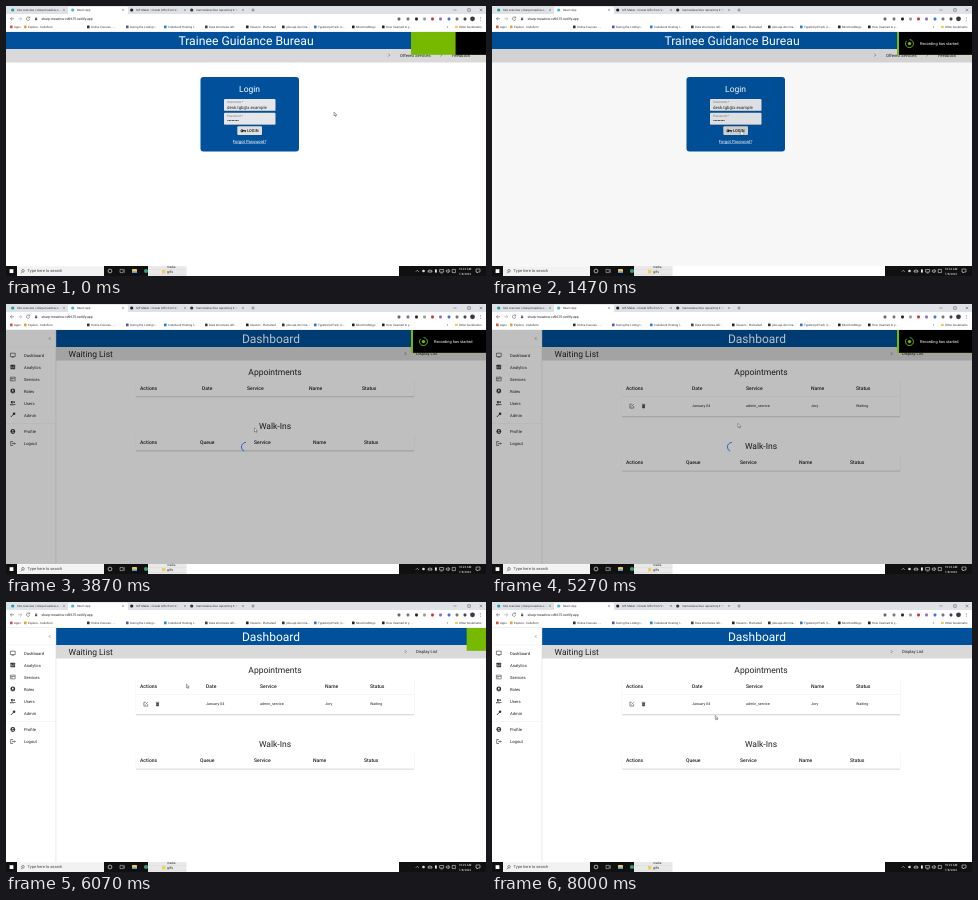
These frames come from a looping animation (480x270 px, 8740 ms). An HTML page:

```html
<!DOCTYPE html>
<html lang="en">
<head>
<meta charset="utf-8">
<title>Dashboard login</title>
<style>
html, body { margin: 0; width: 100%; height: 100%; overflow: hidden; background: #fff; }
svg { display: block; width: 480px; height: 270px; font-family: Roboto, sans-serif; text-rendering: geometricPrecision; }
</style>
</head>
<body>
<svg id="stage" viewBox="0 0 480 270"></svg>
<script>
const LOOP = 8740;
const BLUE = '#00509b', GREEN = '#76b900', INK = '#222';

const text = (x, y, str, size, fill = INK, more = '') =>
  `<text x="${x}" y="${y}" font-size="${size}" fill="${fill}" ${more}>${str}</text>`;
const mid = (x, y, str, size, fill) => text(x, y, str, size, fill, 'text-anchor="middle"');
const bold = (x, y, str, size, fill) => text(x, y, str, size, fill, 'font-weight="500"');
const rect = (x, y, w, h, fill, more = '') =>
  `<rect x="${x}" y="${y}" width="${w}" height="${h}" fill="${fill}" ${more}/>`;
const dot = (x, y, r, fill) => `<circle cx="${x}" cy="${y}" r="${r}" fill="${fill}"/>`;
const line = (d, stroke = '#444', w = 0.6, more = '') =>
  `<path d="${d}" fill="none" stroke="${stroke}" stroke-width="${w}" ${more}/>`;
const group = (id, body, more = '') => `<g id="${id}" ${more}>${body}</g>`;
const chevron = (x, y) => line(`M${x - 0.7} ${y - 1.4}l1.4 1.4l-1.4 1.4`, '#444', 0.5);
const cross = (x, y, s = 0.9, c = '#555') =>
  line(`M${x - s} ${y - s}l${2 * s} ${2 * s}M${x + s} ${y - s}l${-2 * s} ${2 * s}`, c, 0.4);

function browser() {
  const tabs = [
    [11, 'Site overview | sharp-meadow-c...', '#17a2a2', 58],
    [71, 'React App', '#42b8d4', 117],
    [130, 'GIF Maker - Create GIFs from V...', '#222', 179],
    [190, 'marrowlane/dsu: repository 4 —', '#333', 237]
  ];
  const marks = [
    [9, 'Apps', '#d85040'], [23, 'Explore - CodeFern', '#e8a030'],
    [57, 'Online Courses - ...', '#e8a030'], [86, 'Online Courses - ...', '#333'],
    [125, 'During the Listing t...', '#5b50b8'], [163, 'Codebook Hosting I...', '#2b7de0'],
    [204, 'Data structures refr...', '#444'], [245, 'Viewers - Plumeleaf', '#222'],
    [281, 'jobs-api-doc/ma...', '#333'], [313, 'TypeScript Pack | L...', '#3178c6'],
    [351, 'MiscUnixBlogs', '#222'], [381, 'How I learned to y...', '#222']
  ].filter((m, i) => i !== 2);
  const tools = [
    [393, '#666'], [402, '#777'], [410.5, '#222'], [418.5, '#999'], [426.5, '#d03030'],
    [434.5, '#8a6ad0'], [443, '#3d78d8'], [451, '#777'], [459, '#444']
  ];
  return rect(0, 0, 480, 8, '#dee1e6') + rect(62, 0.8, 60, 8, '#fff', 'rx="1.4"') +
    tabs.map(([x, s, c, end]) => dot(x - 4.3, 4, 1.6, c) + text(x, 5.1, s, 2.95, '#333') + cross(end, 4)).join('') +
    line('M245.3 4h3.4M247 2.3v3.4', '#444', 0.5) +
    line('M447.5 4h3M461.7 2.7h2.6v2.6h-2.6z', '#333', 0.4) + cross(475, 4, 1.3, '#333') +
    rect(0, 8, 480, 18, '#fff') +
    line('M8 12.8h-3.6m1.6-1.6l-1.6 1.6l1.6 1.6', '#444', 0.5) +
    line('M12.2 12.8h3.6m-1.6-1.6l1.6 1.6l-1.6 1.6', '#999', 0.5) +
    line('M23.4 11.6a1.7 1.7 0 1 0 .3 1.6M23.7 10.6v1.4h-1.4', '#444', 0.5) +
    rect(29, 12.3, 2.2, 1.9, '#555') + line('M29.5 12.4v-.6a.6 .6 0 0 1 1.2 0v.6', '#555', 0.4) +
    text(35.5, 14, 'sharp-meadow-cd9675.netlify.app', 3.4, '#222') +
    tools.map(([x, c]) => rect(x - 1.4, 11.6, 2.8, 2.8, c, 'rx=".8"')).join('') +
    dot(466.5, 12.8, 2.4, '#3a3a40') +
    [11.3, 12.8, 14.3].map(y => dot(474.5, y, 0.4, '#444')).join('') +
    marks.map(([x, s, c]) => rect(x - 5, 19.6, 2.6, 2.6, c, 'rx=".5"') + text(x - 1, 22, s, 2.95, '#333')).join('') +
    line('M441 20l.9 1l-.9 1', '#555', 0.4) + rect(449, 19.8, 2.8, 2.3, '#f3c95a', 'rx=".4"') +
    text(453, 22, 'Other bookmarks', 2.95, '#333') +
    rect(0, 25.4, 480, 0.5, '#e2e4e8');
}

function field(y, label, value) {
  return rect(218, y, 51.5, 12, '#e4e6e9', 'rx="1"') + rect(218, y + 11.6, 51.5, 0.4, '#8b8f94') +
    text(221, y + 4, label, 3.1, '#777') + value;
}

function login() {
  const key = dot(236, 124.7, 1.5, '#222') + rect(236.5, 124.2, 3.6, 1, '#222') +
    rect(238.7, 124.6, 0.9, 1.6, '#222') + dot(235.7, 124.7, 0.5, '#ddd');
  const dots = Array.from({ length: 8 }, (_, i) => dot(221.9 + i * 1.45, 114.5, 0.55, '#222')).join('');
  return rect(0, 26, 480, 17, BLUE) + mid(240, 38.9, 'Trainee Guidance Bureau', 12.2, '#fff') +
    rect(0, 43, 480, 13.5, '#d9d9d9') + chevron(383, 49.2) + text(394, 50.8, 'Offered Services', 4.2) +
    chevron(435, 49.2) + text(446, 50.8, 'Feedback', 4.2) +
    rect(194.5, 71, 98.5, 74.5, BLUE, 'rx="3"') + mid(243.6, 86.4, 'Login', 8.5, '#fff') +
    field(93, 'Username *', text(221, 102.6, 'desk.tgb@x.example', 4.3)) +
    field(106.7, 'Password *', dots) +
    rect(231.3, 120.3, 24.7, 8.8, '#e0e0e0', 'rx="1" id="button"') + key + bold(241, 126.2, 'LOGIN', 4) +
    mid(243.6, 136.9, 'Forgot Password?', 4.2, '#fff') + rect(227.3, 137.5, 32.6, 0.35, '#fff');
}

const HEADS = ['Actions', 'Date', 'Service', 'Name', 'Status'];
const heads = (names, xs, y) => names.map((s, i) => bold(xs[i], y, s, 5)).join('');
const edge = y => rect(130, y, 278, 0.5, '#b5b5b5') + rect(130, y + 0.5, 278, 0.7, '#e6e6e6');
const sides = (y, h) => rect(129.7, y, 0.3, h, '#eee') + rect(408, y, 0.3, h, '#e4e4e4');

const icons = {
  Dashboard: line('M-2.4 -1.8h4.8v3.4h-4.8zM-1 2.3h2', '#333', 0.6),
  Analytics: rect(-2.3, -2.3, 4.6, 4.6, '#333', 'rx=".6"') + line('M-1.1 1.3v-2.2M0 1.3v-1.2M1.1 1.3v-2.8', '#fff', 0.5),
  Services: line('M-2.4 -1.9h4.8v3.8h-4.8zM-2.4 -.6h4.8M-.8 -.6v2.5', '#333', 0.5),
  Roles: dot(0, 0, 2.4, '#333') + dot(0, -0.6, 0.8, '#fff') + line('M-1.2 1.2q1.2 -1 2.4 0', '#fff', 0.5),
  Users: dot(-0.9, -1, 1.1, '#333') + dot(1.3, -0.9, 0.9, '#333') + line('M-2.6 1.8q1.7 -2.2 3.4 0zM.8 1.5h1.9', '#333', 0.7),
  Admin: line('M-2 2l3 -3', '#333', 0.9) + dot(1.3, -1.2, 1.3, '#333'),
  Profile: dot(0, 0, 2.4, '#333') + dot(0, -0.7, 0.8, '#fff') + line('M-1.3 1.3q1.3 -1.1 2.6 0', '#fff', 0.6),
  Logout: line('M.2 -2h-2.3v4h2.3M-.8 0h3.2m-1.1 -1.1l1.1 1.1l-1.1 1.1', '#333', 0.6)
};

function sidebar() {
  const ys = [51, 63, 75, 87, 99, 111, 127.5, 139.5];
  return rect(0, 26, 50, 234, '#fff') + rect(49.7, 26, 0.5, 234, '#d8d8d8') +
    line('M44.4 33.2l-1.2 1.3l1.2 1.3', '#444', 0.5) +
    rect(0, 42.8, 50, 0.3, '#e2e2e2') + rect(0, 119, 50, 0.3, '#e2e2e2') +
    Object.entries(icons).map(([name, art], i) =>
      `<g transform="translate(6.8 ${ys[i]})">${art}</g>` + text(18, ys[i] + 1.5, name, 4.15)).join('');
}

function dashboard() {
  const empty = heads(HEADS, [134, 196, 241, 303, 356], 85.7) + edge(92.3) + sides(77, 15.5);
  const row = heads(HEADS, [134, 200, 254, 319, 364], 85.7) + rect(130, 92.4, 278, 0.3, '#dcdcdc') +
    edge(112.3) + sides(77, 35.5) +
    line('M139.8 100.2h-1.9v3.9h3.8v-1.9M139.4 102.6l2.3 -2.4', '#333', 0.55) +
    rect(150.2, 100.9, 2.7, 3.3, '#333', 'rx=".4"') + rect(149.8, 99.9, 3.5, 0.6, '#333') +
    line('M151 101.7v1.7M152 101.7v1.7', '#fff', 0.3) +
    [[200, 'January 04'], [254, 'admin_service'], [319, 'Jory'], [364, 'Waiting']]
      .map(([x, s]) => text(x, 103.3, s, 3.7)).join('');
  const walk = mid(269, 125.3, 'Walk-Ins', 8.5) +
    heads(['Actions', 'Queue', ...HEADS.slice(2)], [134, 194, 248, 307, 358], 139.8) +
    edge(146.6) + sides(131, 15.6);
  return rect(50, 26, 430, 17, BLUE) + mid(265, 38.9, 'Dashboard', 12, '#fff') +
    rect(50, 43, 430, 13.5, '#d9d9d9') + text(62.5, 53, 'Waiting List', 8.5) +
    chevron(399.5, 49.6) + text(410, 51.3, 'Display List', 4.2) + sidebar() +
    mid(269, 71.4, 'Appointments', 8.5) +
    group('empty', empty) + group('row', row) + group('walk', walk);
}

function toast() {
  return rect(405, 26, 75, 22.8, GREEN, 'id="green"') + rect(407, 26, 75, 22.8, '#000', 'id="black"') +
    group('note', line('M414.6 34.8a4 4 0 1 0 3 -1.2', GREEN, 0.9) + dot(417.5, 37.6, 1.7, GREEN) +
      text(428, 39, 'Recording has started', 3.95, '#fff'));
}

function taskbar() {
  return rect(0, 260, 480, 10, '#fff') +
    rect(0, 260, 11, 10, '#101010') + rect(3.6, 263.2, 3.8, 3.8, '#fff') +
    rect(11, 260.3, 87, 9.7, '#f2f2f2') + line('M16.3 265.9l-1.4 1.4', '#333', 0.5) +
    `<circle cx="17" cy="264.8" r="1.3" fill="none" stroke="#333" stroke-width=".5"/>` +
    text(21.5, 266.4, 'Type here to search', 4, '#444') +
    rect(98, 260, 44, 10, '#101010') +
    `<circle cx="104" cy="265" r="1.9" fill="none" stroke="#fff" stroke-width=".6"/>` +
    line('M114 263.4h3.2v3.2h-3.2zM118.3 263.2v3.6', '#ddd', 0.5) +
    rect(126, 263, 5, 4, '#f5c84c', 'rx=".4"') + rect(126, 265.4, 5, 1.6, '#4a9fe0') +
    dot(140, 265, 2.1, '#3a9d6e') +
    rect(142, 260, 38.5, 10, '#e9e9e9') + rect(142, 263.2, 38.5, 0.3, '#ccc') +
    rect(142, 268.6, 38.5, 0.3, '#ccc') + rect(156, 264, 3.4, 3.4, '#f3cb62') +
    text(161, 267.2, 'gifs', 3.6) + text(161, 261.6, 'media', 3) +
    rect(393, 260, 87, 10, '#101010') +
    line('M409.8 265.8l1.5 -1.5l1.5 1.5', '#fff', 0.5) + dot(417.5, 265, 1.3, '#ddd') +
    line('M422 266h4q.4 -2 -2 -2t-2 2z', '#fff', 0.6) + rect(429, 263.3, 1.8, 3.4, '#eee', 'rx=".8"') +
    line('M433.6 263.5h4v2.6h-4zM434.6 267h2', '#fff', 0.5) +
    line('M440.3 264.3h1l1 -1v3.6l-1 -1h-1zM443.3 263.8q1 1.2 0 2.4', '#fff', 0.5) +
    line('M446.2 263.4h3.2v3.2h-3.2z', '#fff', 0.5) +
    mid(459, 264.3, '10:23 AM', 2.95, '#fff') + mid(459, 268.6, '7/8/2022', 2.95, '#fff') +
    line('M470 263h4v3h-2l-1 1v-1h-1z', '#fff', 0.5);
}

const spinner = `<circle id="spin" cx="240" cy="143" r="4.59" fill="none" stroke="#1a56c4" stroke-width=".85"/>`;
const pointer = group('pointer',
  group('arrow', '<path d="M0 0v3.9l.9-.8l.6 1.4l.7-.3l-.6-1.4h1.2z" fill="#fff" stroke="#222" stroke-width=".4"/>') +
  group('hand', '<path d="M0 .4q.5-.7 1 0v1.6l2 .5v1.6l-.6 1h-1.9l-1.6-2l.3-.5l.8.5z" fill="#fff" stroke="#222" stroke-width=".35"/>'));

document.getElementById('stage').innerHTML =
  rect(0, 0, 480, 270, '#fff') + browser() + group('login', login()) + group('dash', dashboard()) +
  rect(0, 26, 480, 234, '#000', 'id="shade"') + spinner + taskbar() + toast() + pointer;

const el = {};
document.querySelectorAll('#stage [id]').forEach(n => el[n.id] = n);
const set = (id, name, value) => el[id].setAttribute(name, value);
const show = (id, on) => set(id, 'visibility', on ? 'inherit' : 'hidden');

const clamp = v => Math.min(1, Math.max(0, v));
const ramp = (t, a, b) => clamp((t - a) / (b - a));
const smooth = p => p * p * (3 - 2 * p);
const out = p => 1 - (1 - p) ** 3;

// time, x, y of the pointer tip
const path = [
  [0, 328, 106], [70, 328, 106], [400, 300, 112], [800, 249, 124], [3870, 248.5, 124],
  [4800, 246, 119.5], [5730, 246, 119.5], [6070, 180.5, 82], [6400, 154, 72], [6650, 154, 70],
  [7050, 322, 95], [7530, 199, 114], [7670, 223.3, 113.5], [LOOP, 223.3, 113.5]
];

function pointerAt(t) {
  const i = path.findIndex(k => k[0] > t);
  const [a, b] = [path[i - 1], path[i]];
  const p = ramp(t, a[0], b[0]);
  return [1, 2].map(n => a[n] + (b[n] - a[n]) * p);
}

const CLICK = 1420, ENTER = 3870, ROW = 4530, READY = 5330;

function spin(t) {
  const p = ((t - CLICK) / 1400 % 1 + 1) % 1;
  const grow = smooth(clamp(p * 2)), shrink = smooth(clamp(p * 2 - 1));
  const unit = 4.59 / 20.2;
  set('spin', 'stroke-dasharray', `${(1 + 99 * grow) * unit} ${200 * unit}`);
  set('spin', 'stroke-dashoffset', -(15 * grow + 110 * shrink) * unit);
  set('spin', 'transform', `rotate(${360 * p} 240 143)`);
}

function draw(t) {
  const inside = t >= ENTER, filled = t >= ROW, busy = t >= CLICK && t < READY;
  show('login', !inside);
  show('dash', inside);
  show('empty', !filled);
  show('row', filled);
  set('walk', 'transform', `translate(0 ${filled ? 20.2 : 0})`);
  set('button', 'fill', t > 780 ? '#d5d5d5' : '#e0e0e0');

  const dim = busy ? smooth(ramp(t, CLICK, CLICK + 225)) : 0;
  set('shade', 'opacity', 0.25 * dim);
  set('spin', 'opacity', dim);
  spin(t);

  const leave = smooth(ramp(t, 5730, 5950));
  set('black', 'x', 450 - 43 * out(ramp(t, 0, 300)) + 73 * leave);
  set('green', 'x', 405 + 75 * ramp(t, 5930, 6120));
  set('note', 'opacity', ramp(t, 250, 500) * (1 - ramp(t, 5680, 5760)));

  const [x, y] = pointerAt(t);
  const hand = t > 780 && !inside;
  set('pointer', 'transform', `translate(${x} ${y})`);
  show('hand', hand);
  show('arrow', !hand);
}

const start = performance.now();
function tick() {
  draw((performance.now() - start) % LOOP);
  requestAnimationFrame(tick);
}
tick();
</script>
</body>
</html>
```
